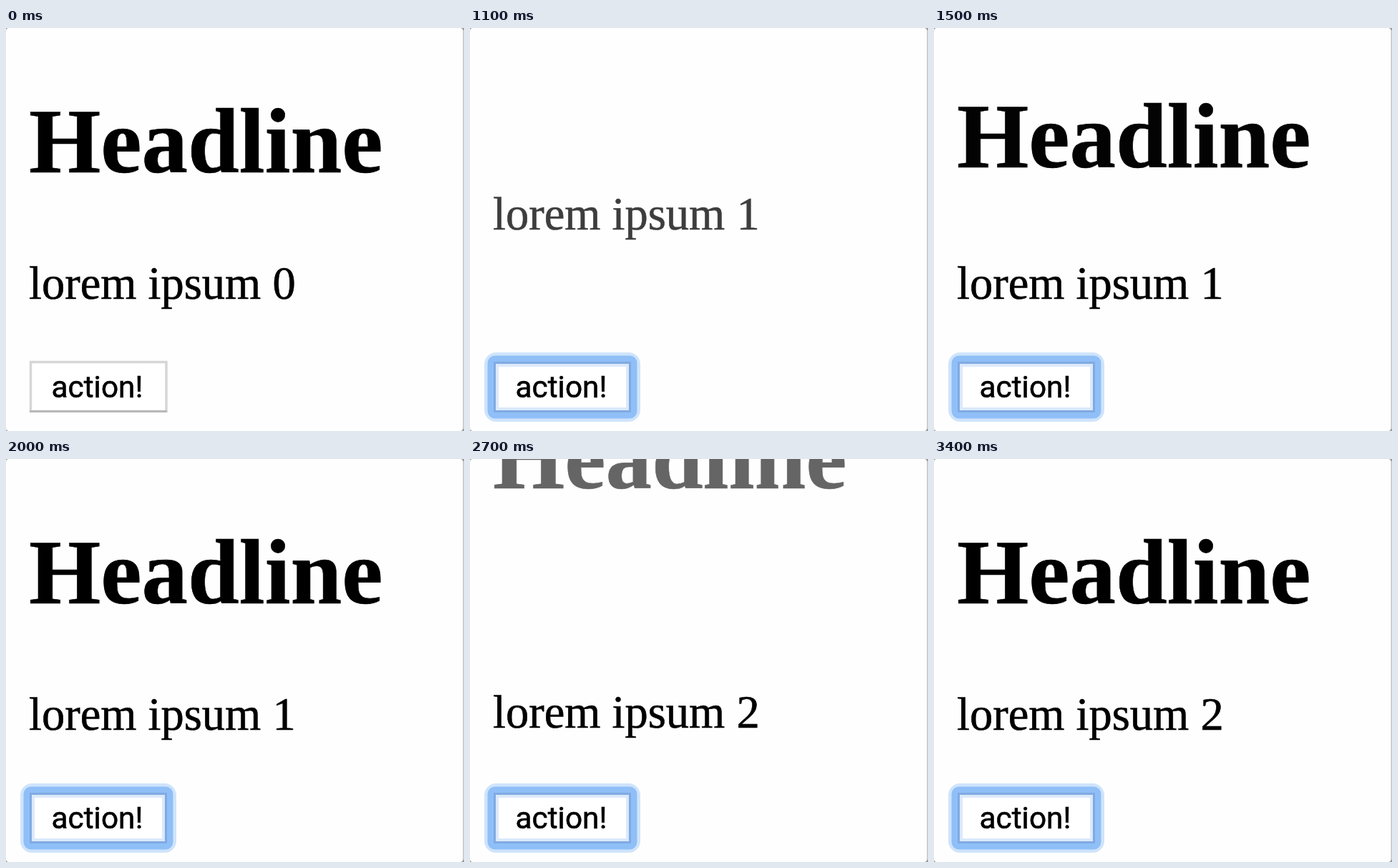
An HTML page that plays this animation: 640x564 px, repeating every 3.5 s.

```html
<!DOCTYPE html>
<html>
<head>
<meta charset="utf-8">
<style>
html, body { margin: 0; width: 100%; height: 100%; overflow: hidden; background: #fff; }
svg { display: block; }
text { stroke: #000; stroke-width: .6; }
.serif { font-family: "Liberation Serif", Times, serif; }
#action { font: 42.4px Roboto, sans-serif; }
</style>
</head>
<body>
<svg width="640" height="564" viewBox="0 0 640 564">
  <rect width="640" height="564" fill="#999"/>
  <path d="M639 3V561" stroke="#c4c4c4" stroke-width="2"/>
  <rect width="638.5" height="564" rx="4" fill="#fefefe"/>
  <text id="head" class="serif" x="32" y="201.5" font-size="129" font-weight="bold">Headline</text>
  <text id="para" class="serif" x="32" y="378.5" font-size="64.5"></text>
  <rect x="34.5" y="467.5" width="189.5" height="69" fill="#fff" stroke="#d6d6d6" stroke-width="3.5"/>
  <path id="shade" stroke="#b9b9b9" stroke-width="3"/>
  <g id="ring" fill="none">
    <rect x="22.5" y="456.5" width="213" height="92" rx="14" stroke="#cfe4fb" stroke-width="5"/>
    <rect x="29" y="463" width="200" height="79" rx="6" stroke="#90bff7" stroke-width="9"/>
    <rect x="34.5" y="468.5" width="189" height="68" stroke="#80aae2" stroke-width="3"/>
    <rect x="38" y="472" width="182" height="61" stroke="#dbe9fb" stroke-width="4"/>
  </g>
  <text id="action" x="63.5" y="517">action!</text>
</svg>
<script>
const $ = id => document.getElementById(id);
const LOOP = 3500, TICK = 100, DURATION = 436, DELAY = 238, DROP = 400;
const CLICKS = [{ at: 900, start: 900 }, { at: 2300, start: 2311 }];

// cubic-bezier(.25, .1, .25, 1)
function ease(x) {
  if (x <= 0) return 0;
  if (x >= 1) return 1;
  const curve = (s, a, b) => 3 * a * s * (1 - s) ** 2 + 3 * b * s * s * (1 - s) + s ** 3;
  let lo = 0, hi = 1;
  for (let i = 0; i < 30; i++) {
    const mid = (lo + hi) / 2;
    if (curve(mid, .25, .25) < x) lo = mid; else hi = mid;
  }
  return curve(lo, .1, 1);
}

function dropIn(el, elapsed) {
  const p = ease(elapsed / DURATION);
  el.setAttribute("transform", `translate(0 ${(p - 1) * DROP})`);
  el.setAttribute("opacity", p);
}

function draw(t) {
  const count = CLICKS.filter(c => t >= c.at).length;
  const elapsed = count ? t - CLICKS[count - 1].start : Infinity;
  const pressed = CLICKS.some(c => t >= c.at - 100 && t < c.at);
  $("para").textContent = "lorem ipsum " + count;
  dropIn($("para"), elapsed);
  dropIn($("head"), elapsed - DELAY);
  $("ring").style.display = t >= CLICKS[0].at - 100 ? "" : "none";
  $("shade").setAttribute("d", pressed ? "M33 467.5H225" : "M33 536.5H225");
}

const begin = performance.now();
function frame() {
  const t = (performance.now() - begin) % LOOP;
  draw(Math.floor(t / TICK) * TICK);
  requestAnimationFrame(frame);
}
frame();
</script>
</body>
</html>
```
